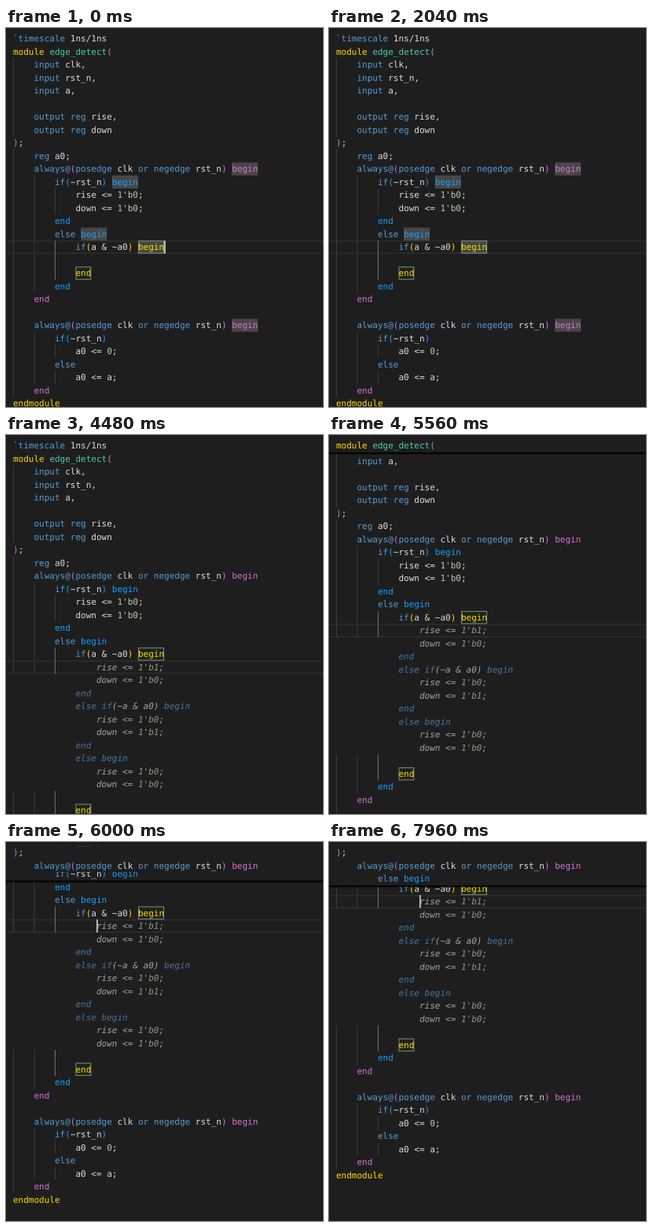
An HTML page that plays this animation: 403 by 480 pixels, repeating every 8 s.

```html
<!DOCTYPE html>
<html lang="en">
<head>
<meta charset="utf-8">
<title>Code completion</title>
<style>
  html, body { margin: 0; width: 100%; height: 100%; overflow: hidden; background: #1e1e1e; }
  svg { display: block; width: 403px; height: 480px; }
  text {
    font: 11px "DejaVu Sans Mono", "Liberation Mono", monospace;
    white-space: pre;
    text-rendering: geometricPrecision;
  }
  .ghost { font-style: italic; opacity: .7; }
</style>
</head>
<body>
<svg id="stage" viewBox="0 0 403 480">
  <defs>
    <linearGradient id="shade" x1="0" y1="0" x2="0" y2="1">
      <stop offset="0" stop-color="#000"/>
      <stop offset=".5" stop-color="#000" stop-opacity=".8"/>
      <stop offset="1" stop-color="#000" stop-opacity="0"/>
    </linearGradient>
  </defs>
</svg>
<script>
const LOOP = 8000, ENTER = 3040, SUGGEST = 3240, BLINK = 480;
const LEFT = 9, TOP = 5.25, LH = 16.5, CW = 6.622, BASE = 12.05, WIDTH = 403;
const BG = '#1e1e1e', PLAIN = '#dcdcdc', KEYWORD = '#569cd6';
const PAIRS = ['#ffd700', '#da70d6', '#179fff'];
const KEYWORDS = /^(`\w+|input|output|reg|always@|posedge|negedge|or|if|else|begin|end)$/;

const head = `\`timescale 1ns/1ns
module edge_detect(
    input clk,
    input rst_n,
    input a,

    output reg rise,
    output reg down
);
    reg a0;
    always@(posedge clk or negedge rst_n) begin
        if(~rst_n) begin
            rise <= 1'b0;
            down <= 1'b0;
        end
        else begin
            if(a & ~a0) begin`.split('\n');

const tail = `
            end
        end
    end

    always@(posedge clk or negedge rst_n) begin
        if(~rst_n)
            a0 <= 0;
        else
            a0 <= a;
    end
endmodule`.split('\n');

const ghost = `                rise <= 1'b1;
                down <= 1'b0;
            end
            else if(~a & a0) begin
                rise <= 1'b0;
                down <= 1'b1;
            end
            else begin
                rise <= 1'b0;
                down <= 1'b0;`.split('\n');

const stage = document.getElementById('stage');
const rowTop = row => TOP + row * LH;
const colX = col => LEFT + col * CW;
const indentOf = line => line.search(/\S/);

function add(parent, tag, attrs = {}, content) {
  const el = document.createElementNS('http://www.w3.org/2000/svg', tag);
  for (const key in attrs) el.setAttribute(key, attrs[key]);
  if (content) el.textContent = content;
  parent.appendChild(el);
  return el;
}

const rect = (parent, x, y, width, height, fill) =>
  add(parent, 'rect', { x, y, width, height, fill });

function colour(token, pairs) {
  if (pairs) {
    if (/^(module|begin|\()$/.test(token)) return PAIRS[pairs.depth++ % 3];
    if (/^(endmodule|end|\))$/.test(token)) return PAIRS[--pairs.depth % 3];
  }
  if (token === 'edge_detect') return '#4ec9b0';
  if (KEYWORDS.test(token)) return KEYWORD;
  if (/^\d+('b\d)?$/.test(token)) return '#b5cea8';
  return PLAIN;
}

function drawLine(parent, line, y, pairs) {
  if (!line.trim()) return;
  const el = add(parent, 'text', { x: colX(indentOf(line)), y: y + BASE });
  if (!pairs) el.setAttribute('class', 'ghost');
  for (const token of line.trim().match(/`\w+|always@|\d+'b\d|\w+|\s+|./g))
    add(el, 'tspan', { fill: colour(token, pairs) }, token);
}

function drawGuides(parent, lines, isGhost, endRow) {
  lines.forEach((line, row) => {
    if (isGhost(row) && row > 17) return;
    const next = lines.slice(row).find((l, i) => l.trim() && !isGhost(row + i));
    const depth = Math.ceil(indentOf(next) / 4);
    for (let i = 0; i < depth; i++) {
      const active = i === 2 && row >= 16 && row <= endRow;
      rect(parent, colX(i * 4), rowTop(row), 1, LH, active ? '#707070' : '#3c3c3c');
    }
  });
}

function box(parent, lines, row, word) {
  add(parent, 'rect', {
    x: colX(lines[row].lastIndexOf(word)) + .5, y: rowTop(row) + .5,
    width: word.length * CW - 1, height: LH - 1,
    fill: 'rgba(0,100,0,.1)', stroke: '#888', 'stroke-width': 1
  });
}

function buildView(middle, current, ghostRows, marked) {
  const view = add(scroller, 'g');
  const lines = [...head, ...middle, ...tail];
  const isGhost = row => row >= 17 && row < 17 + ghostRows;
  const endRow = head.length + middle.length + 1;

  for (const y of [rowTop(current), rowTop(current + 1) - 1])
    rect(view, 0, y, WIDTH, 1.2, '#303030');
  drawGuides(view, lines, isGhost, endRow);
  if (marked) lines.forEach((line, row) => {
    const col = line.lastIndexOf('begin');
    if (col >= 0) rect(view, colX(col), rowTop(row), 5 * CW, LH, '#474747');
  });
  box(view, lines, 16, 'begin');
  box(view, lines, endRow, 'end');

  const pairs = { depth: 0 };
  lines.forEach((line, row) => drawLine(view, line, rowTop(row), isGhost(row) ? null : pairs));
  return view;
}

const scroller = add(stage, 'g');
const views = [
  buildView([], 16, 0, true),
  buildView([''], 17, 0, false),
  buildView(ghost, 17, ghost.length, false)
];
const caret = rect(scroller, 0, 0, 1.8, LH, '#c4c4c2');

// Sticky scope headers: first row, last row, nesting, bracket depth at line start
const shadow = rect(stage, 0, 0, WIDTH, 3.4, 'url(#shade)');
const scopes = [[1, 7, 0, 0], [8, 37, 0, 2], [10, 29, 1, 1], [11, 13, 2, 2], [15, 28, 2, 2]]
  .map(([first, last, level, depth]) => ({ first, last, level, depth }));
for (const s of [...scopes].reverse()) {
  s.el = add(stage, 'g');
  rect(s.el, 0, 0, WIDTH, LH, BG);
  drawLine(s.el, head[s.first], 0, { depth: s.depth });
}
rect(stage, 0, 0, WIDTH, TOP, BG);

const scrollSteps = [
  [5160, 0], [5320, 6], [5460, 24], [5600, 55], [5760, 111], [5880, 153],
  [6000, 187.5], [6120, 206], [6240, 214.5], [6360, 218.5]
];

function scrollAt(t) {
  if (t <= scrollSteps[0][0]) return 0;
  const i = scrollSteps.findIndex(step => step[0] >= t);
  if (i < 0) return scrollSteps.at(-1)[1];
  const [t0, y0] = scrollSteps[i - 1], [t1, y1] = scrollSteps[i];
  return y0 + (y1 - y0) * (t - t0) / (t1 - t0);
}

function caretOn(t) {
  if (t < 800) return true;
  const since = t < ENTER ? t - 800 + BLINK : t - ENTER;
  return Math.floor(since / BLINK) % 2 === 0;
}

const show = (el, on) => el.setAttribute('visibility', on ? 'visible' : 'hidden');
const moveY = (el, y) => el.setAttribute('transform', `translate(0 ${y})`);

function drawSticky(scroll) {
  let bottom = 0;
  for (const s of scopes) {
    const slot = s.level * LH;
    const end = (s.last + 1) * LH - scroll;
    const on = s.first * LH - scroll < slot && end > slot;
    show(s.el, on);
    if (!on) continue;
    const y = slot + Math.min(0, end - slot - LH);
    moveY(s.el, TOP + y);
    bottom = Math.max(bottom, y + LH);
  }
  show(shadow, bottom > 0);
  shadow.setAttribute('y', TOP + bottom);
}

function draw(t) {
  const phase = t < ENTER ? 0 : t < SUGGEST ? 1 : 2;
  views.forEach((view, i) => show(view, i === phase));
  caret.setAttribute('x', colX(phase ? 16 : 29));
  caret.setAttribute('y', rowTop(phase ? 17 : 16));
  show(caret, caretOn(t));
  const scroll = scrollAt(t);
  moveY(scroller, -scroll);
  drawSticky(scroll);
}

const start = performance.now();
function tick() {
  draw((performance.now() - start) % LOOP);
  requestAnimationFrame(tick);
}
tick();
</script>
</body>
</html>
```
